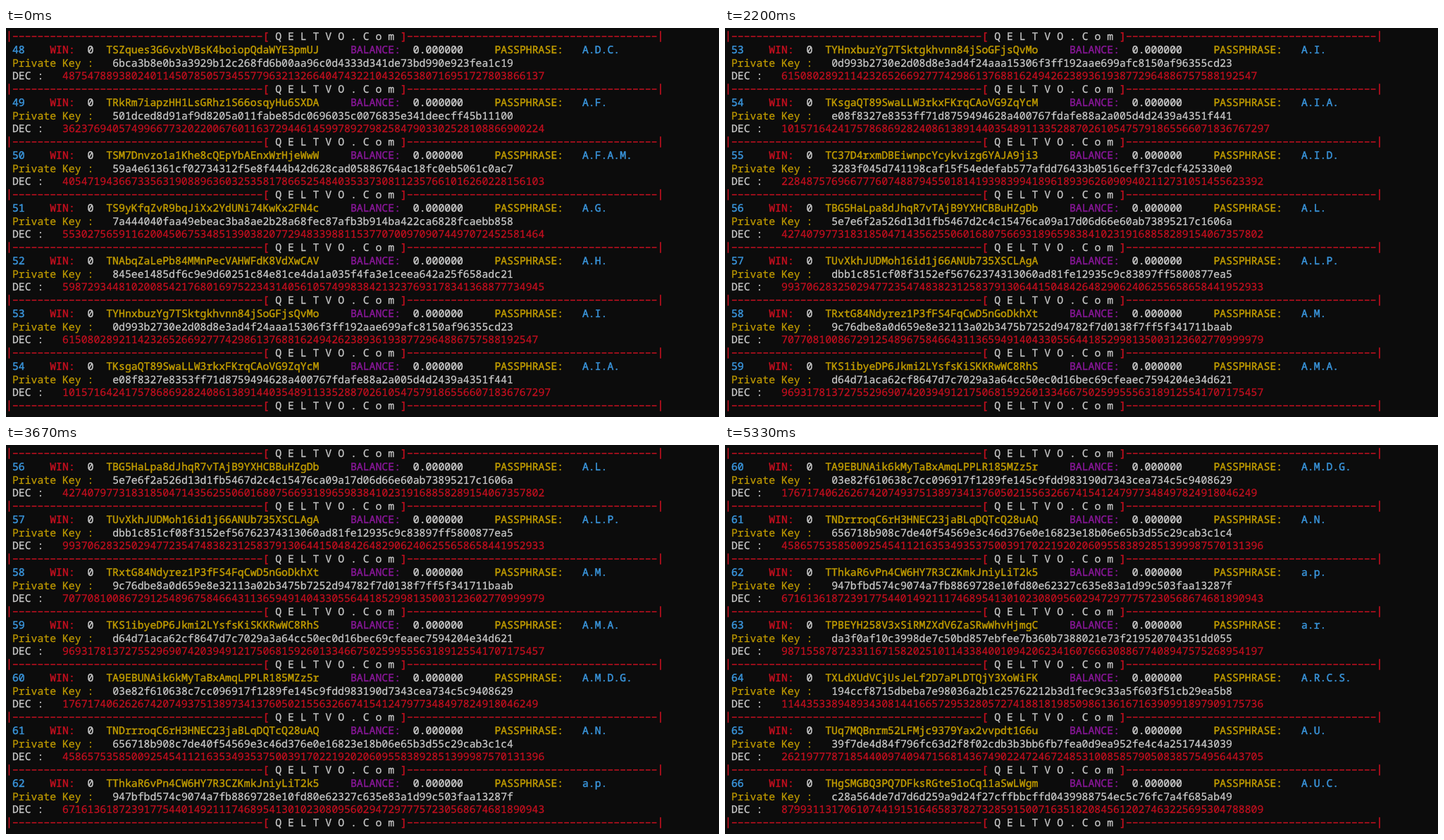
Recreate the animation shown at these times as an HTML page. Size 1012 px wide and 553 px high, loop 5660 ms.

```html
<!DOCTYPE html>
<html lang="en">
<head>
<meta charset="utf-8">
<title>Terminal log</title>
<style>
  html, body { margin: 0; width: 100%; height: 100%; overflow: hidden; background: #0c0c0c; }
  svg { display: block; width: 1012px; height: 553px; }
  text {
    font: 14.82px "Noto Sans Mono", "DejaVu Sans Mono", monospace;
    text-rendering: geometricPrecision;
    white-space: pre;
    stroke-width: 0.25px;
  }
  .strong { font-weight: 500; stroke-width: 0.45px; }
</style>
</head>
<body>
<svg id="stage" viewBox="0 0 1012 553"><g id="log"></g></svg>
<script>
const NS = 'http://www.w3.org/2000/svg';
const CELL = 8.89, LINE = 18.75, BASE = 17.2, BLOCK = LINE * 4;
const FIRST = 48, LOOP = 5660;
const RED = '#c50f1f', GOLD = '#c19c00', WHITE = '#cccccc', PURPLE = '#881798', BLUE = '#3a96dd';
const SITE = 'Q E L T V O . C o m';

// address, private key, passphrase
const records = `
TSZques3G6vxbVBsK4boiopQdaWYE3pmUJ 6bca3b8e0b3a3929b12c268fd6b00aa96c0d4333d341de73bd990e923fea1c19 A.D.C.
TRkRm7iapzHH1LsGRhz1S66osqyHu6SXDA 501dced8d91af9d8205a011fabe85dc0696035c0076835e341deecff45b11100 A.F.
TSM7Dnvzo1a1Khe8cQEpYbAEnxWrHjeWwW 59a4e61361cf02734312f5e8f444b42d628cad05886764ac18fc0eb5061c0ac7 A.F.A.M.
TS9yKfqZvR9bqJiXx2YdUNi74KwKx2FN4c 7a444040faa49ebeac3ba8ae2b28a68fec87afb3b914ba422ca6828fcaebb858 A.G.
TNAbqZaLePb84MMnPecVAHWFdK8VdXwCAV 845ee1485df6c9e9d60251c84e81ce4da1a035f4fa3e1ceea642a25f658adc21 A.H.
TYHnxbuzYg7TSktgkhvnn84jSoGFjsQvMo 0d993b2730e2d08d8e3ad4f24aaa15306f3ff192aae699afc8150af96355cd23 A.I.
TKsgaQT89SwaLLW3rkxFKrqCAoVG9ZqYcM e08f8327e8353ff71d8759494628a400767fdafe88a2a005d4d2439a4351f441 A.I.A.
TC37D4rxmDBEiwnpcYcykvizg6YAJA9ji3 3283f045d741198caf15f54edefab577afdd76433b0516ceff37cdcf425330e0 A.I.D.
TBG5HaLpa8dJhqR7vTAjB9YXHCBBuHZgDb 5e7e6f2a526d13d1fb5467d2c4c15476ca09a17d06d66e60ab73895217c1606a A.L.
TUvXkhJUDMoh16id1j66ANUb735XSCLAgA dbb1c851cf08f3152ef56762374313060ad81fe12935c9c83897ff5800877ea5 A.L.P.
TRxtG84Ndyrez1P3fFS4FqCwD5nGoDkhXt 9c76dbe8a0d659e8e32113a02b3475b7252d94782f7d0138f7ff5f341711baab A.M.
TKS1ibyeDP6Jkmi2LYsfsKiSKKRwWC8RhS d64d71aca62cf8647d7c7029a3a64cc50ec0d16bec69cfeaec7594204e34d621 A.M.A.
TA9EBUNAik6kMyTaBxAmqLPPLR185MZz5r 03e82f610638c7cc096917f1289fe145c9fdd983190d7343cea734c5c9408629 A.M.D.G.
TNDrrroqC6rH3HNEC23jaBLqDQTcQ28uAQ 656718b908c7de40f54569e3c46d376e0e16823e18b06e65b3d55c29cab3c1c4 A.N.
TThkaR6vPn4CW6HY7R3CZKmkJniyLiT2k5 947bfbd574c9074a7fb8869728e10fd80e62327c635e83a1d99c503faa13287f a.p.
TPBEYH258V3xSiRMZXdV6ZaSRwWhvHjmgC da3f0af10c3998de7c50bd857ebfee7b360b7388021e73f219520704351dd055 a.r.
TXLdXUdVCjUsJeLf2D7aPLDTQjY3XoWiFK 194ccf8715dbeba7e98036a2b1c25762212b3d1fec9c33a5f603f51cb29ea5b8 A.R.C.S.
TUq7MQBnrm52LFMjc9379Yax2vvpdt1G6u 39f7de4d84f796fc63d2f8f02cdb3b3bb6fb7fea0d9ea952fe4c4a2517443039 A.U.
THgSMGBQ3PQ7DFksRGte51oCq11aSwLWgm c28a564de7d7d6d259a9d24f27cffbbcffd0439988754ec5c76fc7a4f685ab49 A.U.C.
`.trim().split('\n').map(row => row.split(' '));

// [start ms, record number at the top]; .75 leaves only its last line
const steps = [
  [0, 48], [330, 48.75], [470, 49], [870, 50], [1270, 50.75], [1330, 51],
  [1800, 52], [2200, 53], [2600, 53.75], [2670, 54], [3070, 54.75], [3130, 55],
  [3670, 56], [4070, 56.75], [4130, 57], [4530, 57.75], [4600, 58],
  [4930, 58.75], [5000, 59], [5330, 60]
];

const log = document.getElementById('log');

function add(parent, tag, attrs) {
  const el = document.createElementNS(NS, tag);
  for (const key in attrs) el.setAttribute(key, attrs[key]);
  return parent.appendChild(el);
}

// The thin outline thickens the strokes of the font a little.
function write(parent, line, col, color, str, cls = '') {
  const attrs = { x: col * CELL, y: BASE + line * LINE, fill: color, stroke: color, class: cls };
  add(parent, 'text', attrs).textContent = str;
}

function drawRule(parent) {
  const mid = 12, dash = 6.8, pad = (CELL - dash) / 2;
  const run = col => `M${col * CELL + pad} ${mid}h${40 * CELL - 2 * pad}`;
  const bar = col => `M${(col + 0.5) * CELL} 4.2v15.6`;
  add(parent, 'path', {
    d: run(1) + run(64), stroke: RED, 'stroke-width': 1.4,
    'stroke-dasharray': `${dash} ${CELL - dash}`
  });
  add(parent, 'path', { d: bar(0) + bar(104), stroke: RED, 'stroke-width': 1.6 });
  write(parent, 0, 41, RED, '[', 'strong');
  write(parent, 0, 43, WHITE, SITE);
  write(parent, 0, 63, RED, ']', 'strong');
}

function drawRecord(parent, num, [address, key, phrase]) {
  const top = (col, color, str) => write(parent, 1, col, color, str, 'strong');
  top(1, BLUE, num);
  top(7, RED, 'WIN:');
  top(13, WHITE, '0');
  top(16, GOLD, address);
  top(55, PURPLE, 'BALANCE:');
  top(65, WHITE, '0.000000');
  top(78, GOLD, 'PASSPHRASE:');
  top(92, BLUE, phrase);
  write(parent, 2, 1, GOLD, 'Private Key :');
  write(parent, 2, 17, WHITE, key);
  write(parent, 3, 1, WHITE, 'DEC :');
  write(parent, 3, 9, RED, BigInt('0x' + key).toString());
}

const blocks = [];
for (let i = 0; i <= records.length; i++) {
  const shift = { transform: `translate(0 ${i * BLOCK})` };
  const rule = add(log, 'g', shift), body = add(log, 'g', shift);
  drawRule(rule);
  if (records[i]) drawRecord(body, FIRST + i, records[i]);
  blocks.push({ rule, body });
}

const show = (el, on) => el.setAttribute('visibility', on ? 'visible' : 'hidden');

function render(ms) {
  const t = ms % LOOP;
  const top = steps.filter(step => step[0] <= t).pop()[1] - FIRST;
  log.setAttribute('transform', `translate(0 ${-top * BLOCK})`);
  blocks.forEach(({ rule, body }, i) => {
    show(rule, i - top <= 7.25);
    show(body, i - top <= 6.25);
  });
}

const start = performance.now();
function tick() {
  render(performance.now() - start);
  requestAnimationFrame(tick);
}
render(0);
requestAnimationFrame(tick);
</script>
</body>
</html>
```
